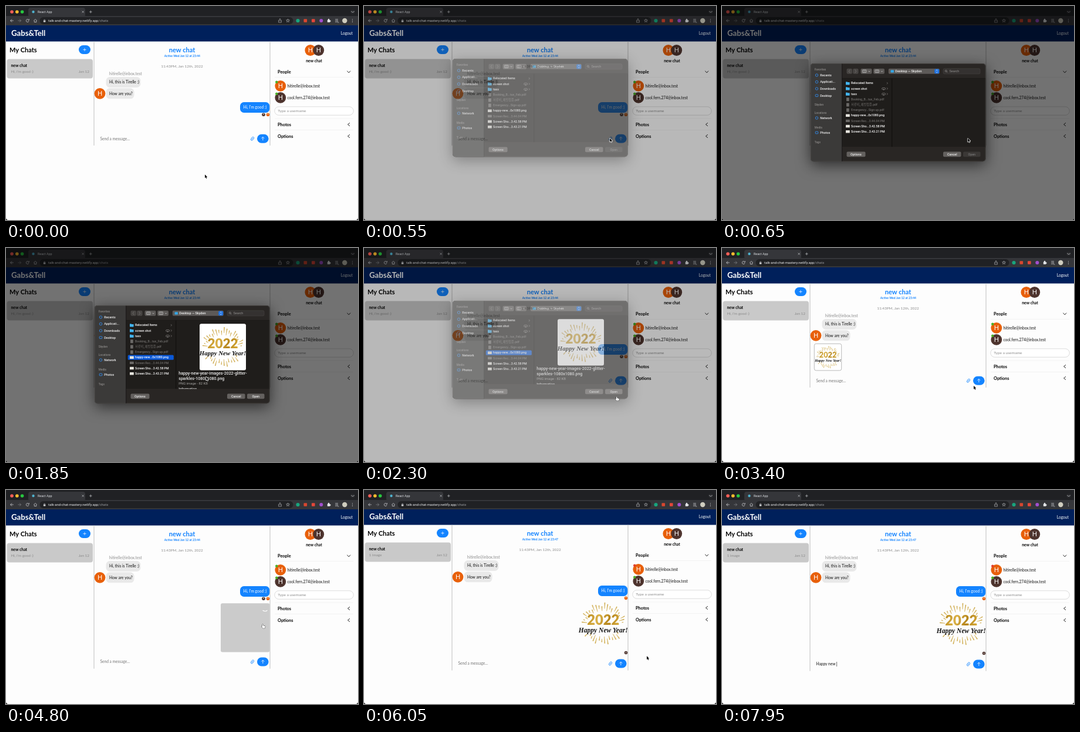
Recreate the animation shown at these times as an HTML page with a canvas. Size 600 by 365 pixels, loop 8000 ms.

```html
<!DOCTYPE html>
<html lang="en">
<head>
<meta charset="utf-8">
<title>Chat</title>
<style>
html, body { margin: 0; width: 100%; height: 100%; overflow: hidden; background: #fff; }
canvas { display: block; width: 600px; height: 365px; }
</style>
</head>
<body>
<canvas id="stage"></canvas>
<script>
const W = 600, H = 365, LOOP = 8000;
const LATO = 'Lato, sans-serif', UI = 'Roboto, sans-serif';
const BLUE = '#1484ff', ORANGE = '#e8600a', BROWN = '#4e342e', NAVY = '#00205b';
const dpr = window.devicePixelRatio || 1;

function setup(cv) {
  cv.width = W * dpr;
  cv.height = H * dpr;
  const ctx = cv.getContext('2d');
  ctx.scale(dpr, dpr);
  return ctx;
}
const stage = setup(document.getElementById('stage'));
const sheetCanvas = document.createElement('canvas');
const sheet = setup(sheetCanvas);
let g = stage;

const T = {
  open: 550, pick: 1500, close: 2250, attach: 2450, send: 4150,
  sent: 5200, nudge: 5650, nudgeEnd: 6450, type: 6950
};

// ---- helpers ----
const clamp = v => Math.max(0, Math.min(1, v));
const ease = v => v * v * (3 - 2 * v);

function box(x, y, w, h, fill, r = 0, stroke, lw = 0.6) {
  g.beginPath();
  g.roundRect(x, y, w, h, r);
  if (fill) { g.fillStyle = fill; g.fill(); }
  if (stroke) { g.strokeStyle = stroke; g.lineWidth = lw; g.stroke(); }
}
function disc(x, y, r, fill) {
  g.beginPath();
  g.arc(x, y, r, 0, 7);
  g.fillStyle = fill;
  g.fill();
}
function line(pts, color, lw = 0.8) {
  g.beginPath();
  for (let i = 0; i < pts.length; i += 2) g.lineTo(pts[i], pts[i + 1]);
  g.strokeStyle = color;
  g.lineWidth = lw;
  g.stroke();
}
// y is the optical middle of the line of text
function text(s, x, y, size, color, { w = 400, align = 'left', font = LATO, style = '' } = {}) {
  g.font = `${style} ${w} ${size}px ${font}`;
  g.textAlign = align;
  g.fillStyle = color;
  g.fillText(s, x, y + size * 0.34);
}
function avatar(x, y, fill, r = 9.4) {
  disc(x, y, r, fill);
  text('H', x, y, r * 1.15, '#fff', { align: 'center' });
}
function chevron(x, y, dx, dy, color, lw = 0.9) {
  line(dx ? [x + dx, y - 2.8, x - dx, y, x + dx, y + 2.8] : [x - 2.8, y - dy, x, y + dy, x + 2.8, y - dy], color, lw);
}

// ---- browser frame ----
function browser() {
  box(0, 0, W, 17, '#202124');
  box(38, 3, 97, 16, '#35363a', 4);
  box(0, 17, W, 16, '#35363a');
  ['#ff5f57', '#febc2e', '#28c840'].forEach((c, i) => disc(10 + i * 8.8, 10, 2.8, c));
  disc(46.5, 10, 2.2, '#4fb0cc');
  text('React App', 54, 10.2, 5.4, '#dfe1e5', { font: UI });
  for (const s of [-1, 1]) line([129.6, 10 - 1.6 * s, 132.8, 10 + 1.6 * s], '#c8cacd', 0.7);
  line([142, 10, 146.6, 10], '#c8cacd', 0.7);
  line([144.3, 7.7, 144.3, 12.3], '#c8cacd', 0.7);
  disc(591, 10, 3.6, '#2a2b2e');
  chevron(591, 10, 0, 0.9, '#d0d2d5', 0.7);

  const ink = '#c9cbce', dim = '#7d7f83';
  line([12.8, 25, 7.5, 25], ink);
  line([10, 22.5, 7.5, 25, 10, 27.5], ink);
  line([20.3, 25, 25.6, 25], dim);
  line([23.1, 22.5, 25.6, 25, 23.1, 27.5], dim);
  g.beginPath();
  g.arc(36.7, 25, 2.4, 0.3, 5.4);
  g.strokeStyle = ink;
  g.stroke();
  line([39.3, 22, 39.3, 24.2, 37.1, 24.2], ink);
  line([47.4, 25, 50, 22.4, 52.6, 25], ink);
  line([48.2, 24.6, 48.2, 27.5, 51.8, 27.5, 51.8, 24.6], ink);

  box(57.5, 19, 432, 12, '#202124', 6);
  box(63.8, 24.5, 3.6, 2.9, ink, 0.4);
  g.beginPath();
  g.arc(65.6, 24.3, 1.2, Math.PI, 0);
  g.strokeStyle = ink;
  g.lineWidth = 0.6;
  g.stroke();
  const host = 'talk-and-chat-mastery.netlify.app';
  text(host, 72, 25.2, 5.9, '#eceef0', { font: UI });
  text('/chats', 72 + g.measureText(host).width, 25.2, 5.9, '#9a9da1', { font: UI });

  line([465.8, 24.3, 464.6, 24.3, 464.6, 28, 469.4, 28, 469.4, 24.3, 468.2, 24.3], ink, 0.6);
  line([467, 26, 467, 21.8], ink, 0.6);
  line([465.5, 23, 467, 21.6, 468.5, 23], ink, 0.6);
  const star = [];
  for (let i = 0; i <= 10; i++) {
    const a = -Math.PI / 2 + i * Math.PI / 5, r = i % 2 ? 1.3 : 3;
    star.push(480.5 + r * Math.cos(a), 25 + r * Math.sin(a));
  }
  line(star, ink, 0.6);
  disc(497.5, 25, 3.1, '#18a57d');
  box(507.5, 22.2, 5.6, 5.6, '#d9472f', 1);
  box(521, 22.2, 5.6, 5.6, '#e4473a', 1);
  disc(537.3, 25, 3, '#a24fd0');
  box(547.8, 23.4, 4.6, 4.4, '#e4e6e8', 0.6);
  disc(550, 23, 1.2, '#e4e6e8');
  disc(552.4, 25.6, 1.2, '#e4e6e8');
  for (const y of [22.8, 25, 27.2]) line([561.2, y, y > 27 ? 564 : 566, y], ink, 0.8);
  line([565.2, 25.6, 565.2, 28, 567.4, 28], ink, 0.7);
  disc(577.3, 25, 4.2, '#cfcdbf');
  for (const y of [22.8, 25, 27.2]) disc(590.5, y, 0.6, ink);
}

// ---- the greeting picture, s wide ----
function greeting(x, y, s) {
  g.save();
  g.translate(x, y);
  g.scale(s / 100, s / 100);
  const n = 44;
  for (let i = 0; i < n; i++) {
    const a = (i + 0.5) / n * 2 * Math.PI, c = Math.cos(a), q = Math.sin(a);
    if (q > 0.05 && q < 0.5) continue;
    const r0 = i % 2 ? 33 : 28, r1 = 37 + (i * 7 % 4) * 2.8;
    const k = q > 0 ? 0.95 : 0.92, r = q > 0 ? r1 : r1 + 1;
    g.beginPath();
    g.moveTo(50 + c * (r0 + 5), 50 + q * r0 * k);
    g.lineTo(50 + c * (r1 + 1) - q * 0.7, 50 + q * r * k + c * 0.7);
    g.lineTo(50 + c * (r1 + 1) + q * 0.7, 50 + q * r * k - c * 0.7);
    g.closePath();
    g.fillStyle = g.strokeStyle = '#c9a23c';
    g.lineWidth = 0.5;
    g.fill();
    g.stroke();
  }
  const gold = g.createLinearGradient(18, 30, 82, 55);
  ['#b98a1c', '#dbb248', '#b5851a', '#d8ab3a'].forEach((c, i) => gold.addColorStop(i / 3, c));
  text('2022', 50, 42.5, 28.5, gold, { w: 900, align: 'center' });
  text('Happy New Year!', 50, 63, 13.8, '#111', {
    w: 700, align: 'center', style: 'italic', font: '"Liberation Serif", "Noto Serif", serif'
  });
  g.restore();
}

// ---- chat page ----
function bubble(s, x, y, w, fill, color) {
  box(x, y, w, 18, fill, 6.5);
  text(s, x + 5.5, y + 9, 6.6, color);
}
function sidePanels(sent) {
  text('My Chats', 6, 75.5, 11, '#000', { w: 700 });
  box(124, 67, 20, 15, BLUE, 7.5);
  line([131.4, 74.5, 136.6, 74.5], '#fff', 0.7);
  line([134, 71.9, 134, 77.1], '#fff', 0.7);
  box(1.5, 90.5, 146.5, 33, '#c9c9c9', 4);
  text('new chat', 8.5, 101.8, 6.8, '#000', { w: 700 });
  text(sent ? '1 image' : "Hi, i'm good :)", 8.5, 112, 6.4, '#8a8a8a');
  text('Jan 12', 142, 112, 6.4, '#8a8a8a', { align: 'right' });

  avatar(518.8, 75.5, ORANGE);
  avatar(532.8, 75.5, BROWN);
  text('new chat', 525, 94, 6.8, '#000', { w: 700, align: 'center' });
  const rows = [['People', 112], ['Photos', 202], ['Options', 222]];
  for (const [label, y] of rows) text(label, 463, y, 7.4, '#000', { w: 700 });
  chevron(584.3, 112.3, 0, 1.6, '#111');
  for (const y of [202, 222]) chevron(584.3, y, 1.7, 0, '#111');
  for (const y of [121.5, 192, 211.5]) line([458, y, 592, y], '#ececec', 0.6);
  const people = [['hitirelle@inbox.test', 136.3, ORANGE], ['cool.fern.274@inbox.test', 156.4, BROWN]];
  people.forEach(([mail, y, c], i) => {
    avatar(467.8, y, c);
    disc(461.2, y - 6.6, 2.2, sent && !i ? '#e0402c' : '#4caf28');
    text(mail, 479.5, y, 6.6, '#111');
  });
  box(457.8, 171.8, 134.5, 14.4, '#fff', 7.2, '#c4c4c4');
  text('Type a username', 463.3, 179, 6.5, '#8a8a8a');
}
function clip(x, y) {
  g.save();
  g.translate(x, y);
  g.rotate(0.65);
  g.beginPath();
  g.roundRect(-1.7, -3.3, 3.4, 6.6, 1.7);
  g.moveTo(0, -1.5);
  g.lineTo(0, 1.8);
  g.strokeStyle = BLUE;
  g.lineWidth = 0.8;
  g.stroke();
  g.restore();
}
function typed(t) {
  const times = [0, 50, 150, 200, 250, 300, 400, 500, 600, 800];
  return 'Happy new '.slice(0, times.filter(k => t >= T.type + k).length);
}
function composer(t, y) {
  const s = typed(t);
  text(s || 'Send a message...', 160.5, y, 6.6, s ? '#111' : '#767676');
  if (t >= T.type - 100) {
    const x = 161 + (s ? g.measureText(s).width : 0);
    line([x, y - 4, x, y + 4], '#111', 0.6);
  }
  clip(420, y);
  box(428, y - 7.5, 19.6, 15, BLUE, 7.5);
  line([437.8, y + 3, 437.8, y - 2.6], '#fff', 0.8);
  line([435.3, y - 0.4, 437.8, y - 2.9, 440.3, y - 0.4], '#fff', 0.8);
}
function page(t) {
  const attached = t >= T.attach && t < T.send;
  const pending = t >= T.send && t < T.sent;
  const sent = t >= T.sent;
  const compY = sent ? 297 : pending ? 293 : 226.3;

  box(0, 33, W, H, '#fdfdfd');
  g.save();
  if (t >= T.nudge && t < T.nudgeEnd) g.translate(0, -1);
  box(0, 32, W, 28.5, NAVY);
  text('Gabs&Tell', 9, 47, 13.2, '#fff', { w: 700 });
  text('Logout', 591, 46.7, 6.7, '#fff', { align: 'right' });
  for (const x of [150, 450]) line([x, 60.5, x, compY + 11.7], '#bdbdbd', 1);
  sidePanels(sent);

  text('new chat', 300, 75, 11, BLUE, { w: 700, align: 'center' });
  text('Active Wed Jan 12 at 23:4' + (sent ? 7 : 4), 300.3, 85.3, 5, BLUE, { w: 700, align: 'center' });
  text('11:43PM, Jan 12th, 2022', 300, 103, 6.4, '#8c8c8c', { align: 'center' });
  text('hitirelle@inbox.test', 176, 115.5, 6.6, '#8c8c8c');
  bubble('Hi, this is Tirelle :)', 170.5, 121, 59, '#e9e9e9', '#111');
  bubble('How are you?', 170.5, 140.3, 48, '#e9e9e9', '#111');
  avatar(160, 149.3, ORANGE);

  if (attached) {
    box(157.3, 163.3, 46.4, 45.6, '#fff', 3, '#a9a9a9', 0.8);
    greeting(158.3, 164, 44.5);
  } else {
    bubble("Hi, I'm good :)", 399, 164, 50.3, BLUE, '#fff');
    avatar(446.5, 185.3, ORANGE, 2.8);
    if (!sent) avatar(439, 185.3, BROWN, 2.8);
  }
  if (pending) {
    box(366, 193.3, 83.5, 83.3, '#cbcbcb', 3);
    const a = Math.PI / 2 + (t - 4800) / 1000 * 2 * Math.PI;
    g.beginPath();
    g.arc(441.5, 201.6, 5.2, a - 0.85, a + 0.85);
    g.strokeStyle = '#fff';
    g.lineWidth = 1.1;
    g.stroke();
  }
  if (sent) {
    greeting(366, 187, 83.5);
    avatar(446.5, 278.5, BROWN, 2.8);
  }
  composer(t, compY);
  g.restore();
}

// ---- file dialog ----
const PLACES = [
  ['Favorites', 108], ['Recents', 118, 1], ['Applicati...', 129.5, 1], ['Downloads', 141, 1], ['Desktop', 152.7, 1],
  ['Skyden', 168.5], ['Locations', 182], ['Network', 191, 1], ['Media', 207], ['Photos', 216, 1], ['Tags', 232]
];
const FILES = [
  ['Relocated Items', 'dir'], ['screen shot', 'cloud'], ['taxs', 'cloud'],
  ['Booking_B...tus_Feb.pdf', 'dim'], ['서류비_예방접종.pdf', 'dim'], ['Emergency...Sign up.pdf', 'dim'],
  ['happy-new...0x1080.png', 'pic'], ['Screen Rec...3.44.04 PM', 'dimpic'],
  ['Screen Sho...3.42.58 PM', 'pic'], ['Screen Sho...3.43.21 PM', 'pic']
];
const FRAME = [151, 98, 298.5, 167.3, 5];

function button(label, x, w, on = true) {
  box(x, 248.6, w, 8.6, on ? '#64615f' : '#3b3836', 2);
  text(label, x + w / 2, 253, 5.4, on ? '#f0f0f0' : '#777', { align: 'center', font: UI, w: 500 });
}
function dialogChrome() {
  g.save();
  g.beginPath();
  g.roundRect(...FRAME);
  g.clip();
  box(151, 98, 300, 168, '#292624');
  box(151, 98, 53.5, 168, '#3b3a39');
  box(205, 123.5, 245, 118, '#1f1d1b');
  g.restore();
  box(151.3, 98.3, 297.9, 166.7, null, 5, '#55524f', 0.6);
  line([204.6, 98.5, 204.6, 265], '#121110', 0.7);
  line([289.7, 123.5, 289.7, 240.5], '#0d0c0b', 0.8);
  line([205, 123.3, 449, 123.3], '#171514', 0.6);
  line([205, 241, 449, 241], '#3a3735', 0.6);

  for (const [label, y, item] of PLACES) {
    if (item) {
      g.strokeStyle = '#2f93ff';
      g.lineWidth = 0.8;
      g.beginPath();
      if (label === 'Desktop' || label === 'Photos') g.roundRect(159.2, y - 1.8, 4.6, 3.6, 0.8);
      else g.arc(161.5, y, 2.2, 0, 7);
      g.stroke();
    }
    text(label, item ? 167.3 : 157.8, y, item ? 5.4 : 4.7, item ? '#f0f0f0' : '#8b8987', { font: UI, w: 500 });
  }

  box(212.5, 106.8, 9.5, 9, '#474442', 2);
  box(223, 106.8, 9.5, 9, '#474442', 2);
  chevron(217.2, 111.3, 1, 0, '#7c7a78', 0.7);
  chevron(227.7, 111.3, -1, 0, '#7c7a78', 0.7);
  for (const x of [236.5, 258]) {
    box(x, 106.8, 19, 9, '#5a5755', 2);
    box(x + 3, 109, 6.5, 4.6, null, 0.5, '#ddd', 0.6);
    line([x + 5.2, 109, x + 5.2, 113.6], '#ddd', 0.5);
    line([x + 7.4, 109, x + 7.4, 113.6], '#ddd', 0.5);
    line([x + 13, 110.7, x + 14.5, 112.2, x + 16, 110.7], '#ddd', 0.7);
  }
  box(283.8, 106.8, 87, 9, '#5d5a58', 2);
  box(287.5, 109.2, 5.4, 4.4, '#35a7e6', 0.7);
  text('Desktop — Skyden', 295.3, 111.4, 5.5, '#f3f3f3', { font: UI, w: 500 });
  box(362.2, 107.4, 8, 7.8, '#1a6fe0', 1.8);
  line([364.6, 110.4, 366.2, 108.9, 367.8, 110.4], '#fff', 0.7);
  line([364.6, 112.2, 366.2, 113.7, 367.8, 112.2], '#fff', 0.7);
  box(377, 106.8, 63, 9, '#343130', 2, '#4d4a48', 0.5);
  g.beginPath();
  g.arc(381.8, 110.8, 1.5, 0, 7);
  g.strokeStyle = '#a8a6a4';
  g.lineWidth = 0.6;
  g.stroke();
  line([382.9, 111.9, 384.3, 113.3], '#a8a6a4', 0.6);
  text('Search', 387.5, 111.4, 5.5, '#918f8d', { font: UI });
}
function fileList(picked) {
  FILES.forEach(([name, kind], i) => {
    const y = 131.7 + i * 9.17, dim = kind.startsWith('dim');
    if (picked && i === 6) box(207.8, y - 4.1, 78, 8.2, '#0a58d8', 1.6);
    if (kind === 'dir' || kind === 'cloud') {
      box(211, y - 2.5, 3, 2, '#2ea3e8', 0.5);
      box(211, y - 1.8, 6.6, 4.5, '#44b6f3', 0.6);
      line([281, y - 1.6, 282.4, y, 281, y + 1.6], '#9a9896', 0.6);
      if (kind === 'cloud') {
        box(272.6, y - 1.4, 6, 3, null, 1.5, '#9a9896', 0.6);
        line([275.6, y, 275.6, y + 3], '#9a9896', 0.6);
      }
    } else if (kind === 'dim') box(212, y - 3, 4.8, 6, '#6a6866', 0.4);
    else box(211, y - 2.2, 6.8, 4.4, dim ? '#6a6866' : '#e8e6df', 0.3);
    text(name, 220, y, 5.2, dim ? '#6d6b69' : '#fff', { font: UI + ', "Noto Sans CJK KR"', w: 500 });
  });
}
function dialog(t) {
  const picked = t >= T.pick;
  dialogChrome();
  fileList(picked);
  if (picked) {
    box(330, 129.3, 79, 79.3, '#fff', 3);
    greeting(330, 129.3, 79);
    const o = { font: UI, w: 500 };
    text('happy-new-year-images-2022-glitter-', 294.3, 213.6, 7, '#ececec', o);
    text('sparkles-1080x1080.png', 294.3, 222.4, 7, '#ececec', o);
    text('PNG image - 82 KB', 294.3, 231, 5.9, '#a5a3a1', { font: UI });
    g.save();
    g.beginPath();
    g.rect(290, 236, 150, 4.6);
    g.clip();
    text('Information', 294.3, 240, 5.9, '#ececec', o);
    g.restore();
  }
  button('Options', 212.5, 32);
  button('Cancel', 377, 30.5);
  button('Open', 411, 29.5, picked);
}
// Soft shadow, kept outside the translucent panel
function sheetShadow() {
  g.save();
  g.beginPath();
  g.rect(-50, -50, W + 100, H + 100);
  g.roundRect(...FRAME);
  g.clip('evenodd');
  g.shadowColor = 'rgba(0,0,0,0.6)';
  g.shadowBlur = 24 * dpr;
  g.shadowOffsetY = 6 * dpr;
  box(...FRAME.slice(0, 4), '#000', 5);
  g.restore();
}
function drawSheet(t) {
  const show = t < T.close ? clamp((t - T.open + 50) / 100) : 1 - clamp((t - T.close) / 100);
  if (show <= 0) return;
  box(0, 0, W, H, `rgba(0,0,0,${0.55 * show})`);
  sheet.clearRect(0, 0, W, H);
  g = sheet;
  dialog(t);
  g = stage;
  g.save();
  g.globalAlpha = show;
  g.translate(0, -16 * (1 - show));
  sheetShadow();
  g.drawImage(sheetCanvas, 0, 0, W, H);
  g.restore();
}

// ---- pointer: time, x, y of the tip ----
const PATH = [
  [0, 339, 287.5], [300, 419, 225.5], [850, 419, 226], [1300, 252, 186], [1650, 252, 186],
  [2050, 430, 253.5], [2350, 430, 253.5], [2900, 429, 235], [3400, 429, 235], [3600, 437, 228.7],
  [5600, 437, 228.7], [6000, 482, 283.3], [6350, 482, 283.3], [6750, 192, 297], [LOOP, 192, 297]
];
function pointer(t) {
  if (t >= T.type) return;
  const i = PATH.findIndex(p => p[0] > t), a = PATH[i - 1], b = PATH[i];
  const k = ease((t - a[0]) / (b[0] - a[0]));
  const hand = (t >= 300 && t < 550) || (t >= 2200 && t < 2450) || (t >= 3550 && t < 5700);
  g.save();
  g.translate(a[1] + (b[1] - a[1]) * k, a[2] + (b[2] - a[2]) * k);
  g.lineJoin = 'round';
  if (t >= 6700) {
    line([0, -3.5, 0, 3.5], '#222', 0.7);
    line([-1.3, -3.7, 1.3, -3.7], '#222', 0.6);
    line([-1.3, 3.7, 1.3, 3.7], '#222', 0.6);
  } else {
    const shape = hand
      ? 'M0 .6Q.7-.4 1.4.6V2.6L4.2 3.2Q5 3.5 4.8 4.6L4.2 7H.9L-1.4 4.4Q-1.3 3.4-.1 4.1Z'
      : 'M0 0V5.9L1.4 4.6L2.4 6.9L3.4 6.5L2.4 4.2H4.3Z';
    const p = new Path2D(shape);
    g.lineWidth = hand ? 0.8 : 1.3;
    g.strokeStyle = hand ? '#111' : '#fff';
    g.fillStyle = hand ? '#fff' : '#000';
    g.stroke(p);
    g.fill(p);
  }
  g.restore();
}

function draw(t) {
  g.fillStyle = '#000';
  g.fillRect(0, 0, W, H);
  g.save();
  g.beginPath();
  g.roundRect(0, 0, W, H, [0, 0, 4, 4]);
  g.clip();
  page(t);
  browser();
  drawSheet(t);
  g.restore();
  pointer(t);
}

const start = performance.now();
function tick() {
  const t = (performance.now() - start) % LOOP;
  draw(Math.floor(t / 50) * 50);
  requestAnimationFrame(tick);
}
tick();
</script>
</body>
</html>
```
